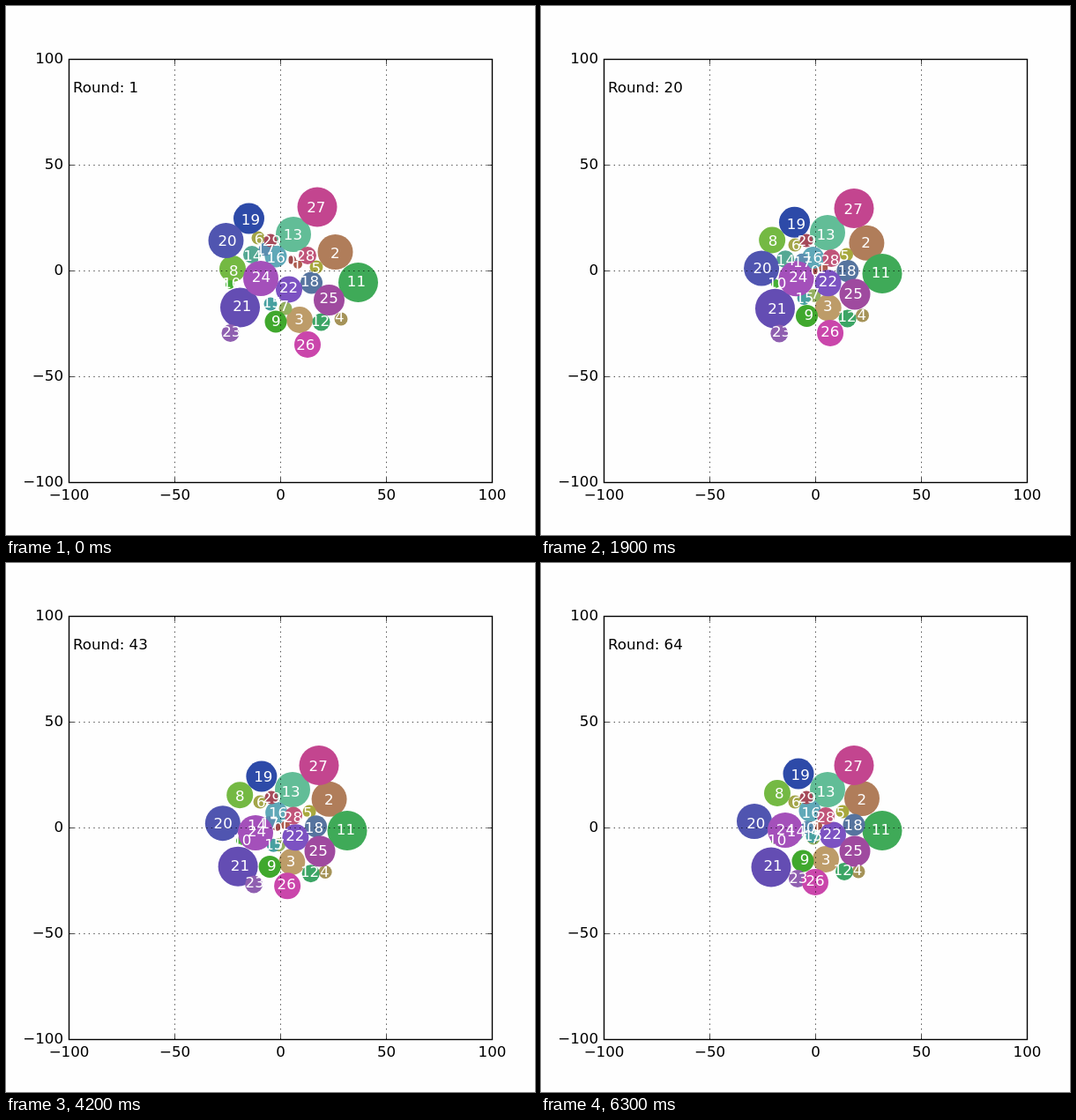
An HTML page with a canvas that plays this animation: 600 px wide and 600 px high, repeating every 6400 ms.

```html
<!DOCTYPE html>
<html lang="en">
<head>
<meta charset="utf-8">
<title>Bubble packing</title>
<style>
  html, body { margin: 0; width: 100%; height: 100%; overflow: hidden; background: #fefefe; }
  canvas { display: block; width: 600px; height: 600px; }
</style>
</head>
<body>
<canvas id="stage" width="600" height="600"></canvas>
<script>
const ctx = document.getElementById('stage').getContext('2d');
const STEP = 100, ROUNDS = 64, SETTLE = 14;
const CX = 311, CY = 300, UNIT = 2.4;
const LEFT = 71.5, TOP = 60.5, SIZE = 480;
const bubbles = [];

// Each bubble is squeezed from start to packed, then drifts to end
function bubble(size, color, start, packed, end = packed) {
  bubbles.push({ r: 2.5 * size, color, start, packed, end });
}

bubble(2, '#a04a4c', [324, 288], [310, 300], [305, 298]);
bubble(2, '#ae5c4e', [331, 293], [321, 297], [314, 298]);
bubble(8, '#b07d5a', [373.5, 279], [370, 269], [364, 267]);
bubble(6, '#bd9c69', [333, 356], [326, 343], [323, 336]);
bubble(3, '#a59358', [380, 355], [365, 351], [360, 350]);
bubble(3, '#a8a83d', [352, 296], [347, 282], [342, 282]);
bubble(3, '#a3a548', [286, 263], [288, 271]);
bubble(3, '#94b060', [317, 343], [310, 330], [309, 312]);
bubble(6, '#74b943', [257, 298], [261.5, 266], [268, 261]);
bubble(5, '#40a82d', [306, 358], [302, 353], [297, 338]);
bubble(2, '#45b035', [254, 316], [266, 315]);
bubble(9, '#3faa58', [399.5, 313.5], [387, 303.5]);
bubble(4, '#3ca565', [357.5, 358.5], [348, 355], [344, 350]);
bubble(8, '#62bd97', [326, 259], [325, 257]);
bubble(4, '#55a893', [279, 282], [276, 285], [288, 306]);
bubble(3, '#47a0a0', [300, 338], [297, 334], [308, 310]);
bubble(5, '#60a8b8', [306, 284], [309, 286], [305, 281]);
bubble(3, '#5c8db0', [294, 276], [295, 287], [302, 300]);
bubble(5, '#56749f', [346.5, 314], [347, 301], [355, 297]);
bubble(7, '#2d4aa8', [275.5, 241], [287, 246], [292, 239]);
bubble(8, '#5055b0', [249.5, 266], [251, 298], [242, 293]);
bubble(9, '#644db3', [265.5, 342], [266, 343], [261, 345]);
bubble(6, '#7c52c2', [321, 321.5], [325, 315], [331, 308.5]);
bubble(4, '#8f5fb0', [254.5, 371], [268, 373], [291, 358]);
bubble(8, '#a450ba', [289, 309], [291, 310], [277, 303]);
bubble(7, '#9f4a9f', [366.5, 333.5], [356, 327]);
bubble(6, '#ca46ab', [342, 384], [330, 372], [311, 362]);
bubble(9, '#c3458f', [353, 228], [355, 229.5]);
bubble(4, '#c0557a', [342, 283], [330, 286], [323, 287]);
bubble(3, '#a54a5a', [300, 266], [301, 266]);

const mix = (a, b, u) => a.map((v, i) => v + (b[i] - v) * u);
const easeOut = u => 1 - (1 - u) ** 2;

function place({ start, packed, end }, n) {
  return n < SETTLE
    ? mix(start, packed, easeOut(n / SETTLE))
    : mix(packed, end, (n - SETTLE) / (ROUNDS - 1 - SETTLE));
}

// Labels sit on whole chart units, cut toward zero
const snap = (v, origin) => origin + UNIT * Math.trunc((v - origin) / UNIT);

function text(s, x, y, align, color) {
  ctx.textAlign = align;
  ctx.fillStyle = color;
  ctx.fillText(s, x, Math.round(y));
}

function line(x1, y1, x2, y2) {
  ctx.beginPath();
  ctx.moveTo(x1, y1);
  ctx.lineTo(x2, y2);
  ctx.stroke();
}

function axes() {
  const right = LEFT + SIZE, bottom = TOP + SIZE;
  const name = v => String(v).replace('-', '\u2212');
  ctx.strokeStyle = '#000';
  ctx.lineWidth = 0.7;
  for (let i = 0; i <= 4; i++) {
    const x = LEFT + i * SIZE / 4, y = TOP + i * SIZE / 4;
    if (i % 4) {
      ctx.setLineDash([1.39, 4.17]);
      line(x, bottom, x, TOP);
      line(LEFT, y, right, y);
      ctx.setLineDash([]);
    }
    line(x, TOP, x, TOP + 5.5);
    line(x, bottom, x, bottom - 5.5);
    line(LEFT, y, LEFT + 5.5, y);
    line(right, y, right - 5.5, y);
    text(name(i * 50 - 100), x, 560, 'center', '#000');
    text(name(100 - i * 50), 65, y + 4.5, 'right', '#000');
  }
  ctx.lineWidth = 1.39;
  ctx.strokeRect(LEFT, TOP, SIZE, SIZE);
}

function draw(n) {
  ctx.fillStyle = '#fefefe';
  ctx.fillRect(0, 0, 600, 600);
  ctx.font = '16.67px "DejaVu Sans", sans-serif';
  const spots = bubbles.map(b => place(b, n));
  bubbles.forEach((b, i) => {
    ctx.fillStyle = b.color;
    ctx.beginPath();
    ctx.arc(...spots[i], b.r, 0, Math.PI * 2);
    ctx.fill();
  });
  axes();
  spots.forEach(([x, y], i) => text(i, snap(x, CX), snap(y, CY) + 5.5, 'center', '#fff'));
  text('Round: ' + (n + 1), 76, 98, 'left', '#000');
}

const begin = performance.now();
let shown = -1;
function tick() {
  const n = Math.floor(Math.max(0, performance.now() - begin) / STEP) % ROUNDS;
  if (n !== shown) draw(shown = n);
  requestAnimationFrame(tick);
}
tick();
</script>
</body>
</html>
```
